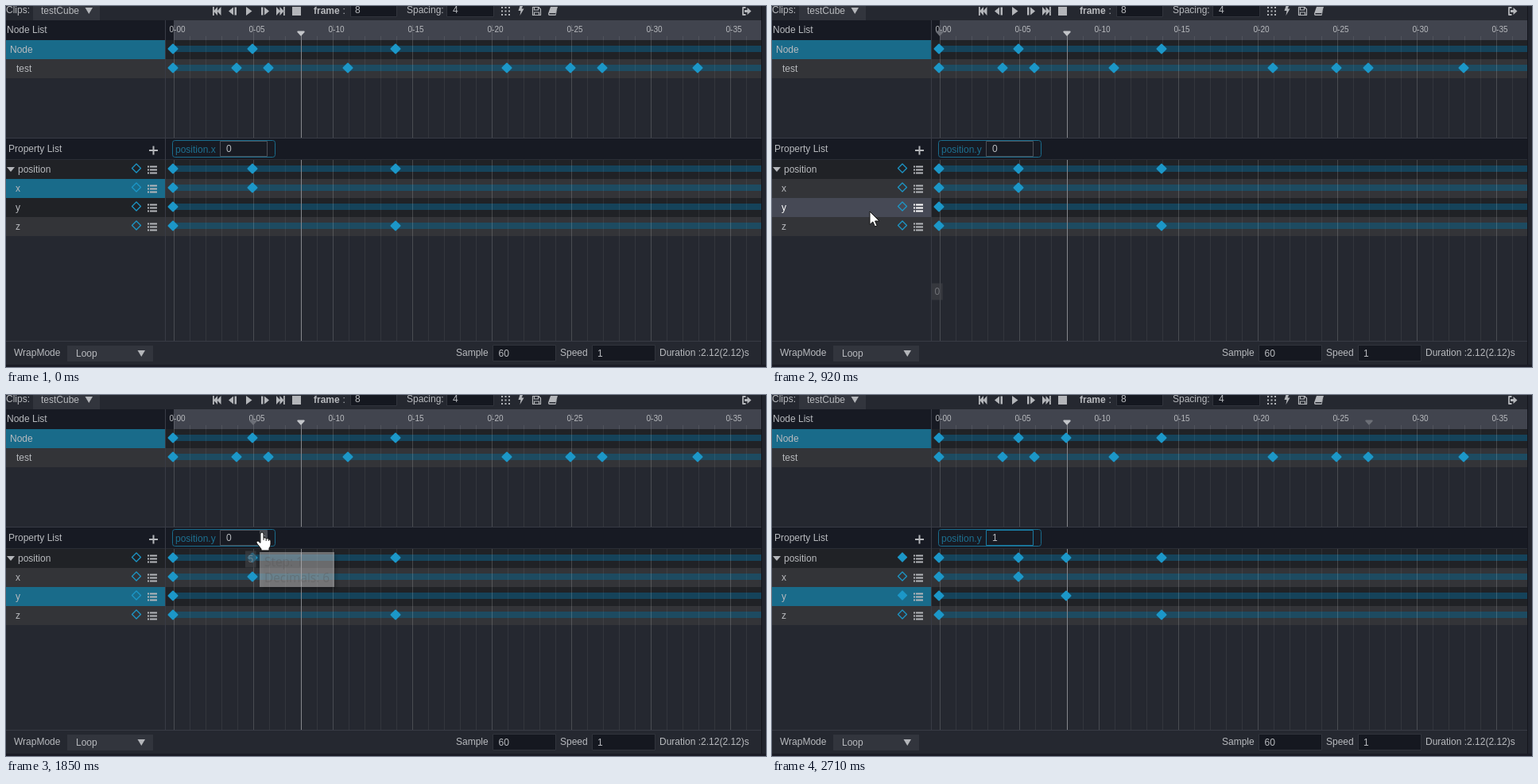
An HTML page with a canvas that plays this animation: 956 px wide and 455 px high, repeating every 2.78 s.

```html
<!DOCTYPE html>
<html lang="en">
<head>
<meta charset="utf-8">
<title>Animation timeline editor</title>
<style>
html, body { margin: 0; width: 100%; height: 100%; overflow: hidden; background: #252830; }
canvas { display: block; width: 956px; height: 455px; }
</style>
</head>
<body>
<canvas id="stage" width="956" height="455"></canvas>
<script>
const ctx = document.getElementById('stage').getContext('2d');
const LOOP = 2780;
const SANS = '"Liberation Sans", Arial, sans-serif';
const C = {
  panel: '#252830', head: '#171a23', ruler: '#41444e', line: '#383b45', input: '#151820',
  select: '#32353d', text: '#b8babe', icon: '#b4b6ba', dark: '#202226', alt: '#333438',
  hover: '#464955', active: '#196b8a', key: '#1c97c8', white: '#ffffff'
};
const frameX = n => 211 + 20 * n;

// Bursts of picture changes: start, end, number of steps.
const bursts = [[150, 610, 7], [760, 1240, 7], [1320, 1540, 4], [1850, 2310, 7], [2480, 2710, 4]];

// Pointer stops: time, x, y.
const path = [
  [150, 522, 436], [303, 360, 408], [457, 211, 360], [533, 109, 267], [610, 123, 259],
  [920, 123, 259], [1000, 134, 256], [1240, 296, 238], [1467, 312, 207], [1540, 322, 174],
  [2310, 322, 174], [2480, 420, 250], [2633, 758, 421]
];

function snap(t) {
  let last = 0;
  for (const [from, to, n] of bursts) {
    const gap = (to - from) / (n - 1);
    for (let i = 0; i < n; i++) if (from + i * gap <= t + 4) last = from + i * gap;
  }
  return last;
}

function pointerAt(t) {
  if (t < 149 || t > 2650) return null;
  let i = 0;
  while (i < path.length - 2 && path[i + 1][0] <= t) i++;
  const [t0, x0, y0] = path[i], [t1, x1, y1] = path[i + 1];
  const k = Math.min(1, Math.max(0, (t - t0) / (t1 - t0)));
  return { x: x0 + (x1 - x0) * k, y: y0 + (y1 - y0) * k };
}

// Drawing helpers
function rect(x, y, w, h, fill) {
  ctx.fillStyle = fill;
  ctx.fillRect(x, y, w, h);
}
function frame(x, y, w, h, stroke, r = 0) {
  ctx.beginPath();
  ctx.roundRect(x + .5, y + .5, w - 1, h - 1, r);
  ctx.lineWidth = 1;
  ctx.strokeStyle = stroke;
  ctx.stroke();
}
function text(str, x, y, fill = C.text, font = '12px ' + SANS) {
  ctx.font = font;
  ctx.fillStyle = fill;
  ctx.fillText(str, x, y);
}
function shape(d, x, y, fill, stroke, width = 1) {
  const p = new Path2D(d);
  ctx.save();
  ctx.translate(x, y);
  if (fill) { ctx.fillStyle = fill; ctx.fill(p); }
  if (stroke) { ctx.strokeStyle = stroke; ctx.lineWidth = width; ctx.lineJoin = 'round'; ctx.stroke(p); }
  ctx.restore();
}
function field(x, y, w, h, value, tx, ty) {
  rect(x, y, w, h, C.input);
  frame(x, y, w, h, '#31343c');
  text(value, tx, ty);
}
const caret = (x, y) => shape('M0 0H9.5L4.75 8Z', x, y, C.icon);
const key = (x, y) => shape('M0-5.6L5.6 0L0 5.6L-5.6 0Z', x, y, C.key, C.key, 1.8);
const tip = (x, fill) => shape('M-4-2.5H4Q5-2.5 4.6-1L0 4L-4.6-1Q-5-2.5-4-2.5Z', x, 34, fill);

function listIcon(y, fill) {
  for (const dy of [-4, 0, 4]) {
    rect(178, y + dy - 1, 2, 2, fill);
    rect(181, y + dy - 1, 9, 2, fill);
  }
}

function topBar() {
  text('Clips:', 0, 9);
  rect(34, 0, 84, 18, C.select);
  text('testCube', 44, 10);
  caret(99.5, 2);
  const back = 'M10.5 0V11L5.5 5.5Z M6 0V11L1 5.5Z M0 0H1.8V11H0Z';
  const step = 'M0 5.5L6 .5V10.5Z M7.5 .5H10V10.5H7.5Z';
  shape(back, 260, 1, C.icon);
  shape(step, 280, 1, C.icon);
  shape('M0 0L7.5 5.5L0 11Z', 302, 1, C.icon);
  shape('M0 .5H2.5V10.5H0Z M4 .5L10 5.5L4 10.5Z', 321, 1, C.icon);
  shape('M0 0V11L5 5.5Z M4.5 0V11L9.5 5.5Z M9 0H10.8V11H9Z', 340, 1, C.icon);
  rect(360, 1, 11, 11, C.icon);
  text('frame', 387, 10, C.text, 'bold 12px ' + SANS);
  text(':', 423.5, 10);
  field(433, -8, 59, 22, '8', 439, 9);
  text('Spacing:', 504, 9);
  field(554, -8, 60, 22, '4', 562, 9);
  for (let i = 0; i < 9; i++) rect(623 + i % 3 * 4.5, 1 + Math.floor(i / 3) * 4.5, 2, 2, C.icon);
  shape('M2 0H5.5L4.2 3.5H7L2 12L3 6H0Z', 644.5, 0, C.icon);
  shape('M.5 .5H8L10.5 3V10.5H.5Z M2.5 .5V4H7.5V.5 M2.5 10.5V7H8.5V10.5', 662, 1, null, C.icon, 1.2);
  shape('M3 0H12L9.5 8H1.5Q.8 9.6 2 9.6H9L11.5 3L9.5 11H1.5Q-.5 10.5 0 8.5Z', 682, 1, C.icon);
  shape('M4.5 1H1V10H4.5', 926, 1, null, C.icon, 1.8);
  shape('M3 4H6.5V1L11.5 5.5L6.5 10V7H3Z', 926, 1, C.icon);
}

function footer() {
  rect(0, 422, 950, 1, C.line);
  text('WrapMode', 10, 441);
  rect(77, 428, 108, 20, C.select);
  text('Loop', 88, 442);
  caret(165.5, 434);
  text('Sample', 566, 441);
  field(612, 427, 80, 21, '60', 619.5, 442);
  text('Speed', 697, 441);
  field(737, 427, 80, 21, '1', 744, 442);
  text('Duration :2.12(2.12)s', 822, 441);
  rect(0, 452, 956, 3, '#1b1c26');
}

function ruler() {
  rect(201, 18, 749, 25, C.head);
  rect(211, 18, 739, 25, C.ruler);
  for (let n = 0; n < 37; n++) {
    const major = n % 5 === 0;
    rect(frameX(n), major ? 24 : 38, 1, major ? 19 : 5, major ? '#5a5d66' : '#50535c');
    if (major) text('0-' + String(n).padStart(2, '0'), frameX(n) - 5.5, 33, C.text, '10px ' + SANS);
  }
}

function rowBand(y, alt) {
  rect(0, y, 950, 24, alt ? C.alt : C.dark);
}
function gridLines() {
  for (let n = 0; n < 37; n++) {
    const tone = n % 5 ? 'rgba(255,255,255,.065)' : 'rgba(255,255,255,.17)';
    rect(frameX(n), 43, 1, 123, tone);
    rect(frameX(n), 194, 1, 228, tone);
  }
}
function track(y, alt, keys) {
  rect(210, y - 4, 740, 8, alt ? '#1d4b61' : '#15435a');
  return () => keys.forEach(n => key(210 + 20 * n, y));
}

function leftCell(y, state) {
  if (state === 'active') rect(0, y, 200, 24, C.active);
  if (state === 'hover') rect(0, y, 200, 24, C.hover);
}

function valueBox(s) {
  frame(209, 169, 130, 22, '#1a6c8c', 3);
  text('position.' + s.axis, 213, 185, '#1d6f8f');
  rect(269, 170, 60, 20, '#181b23');
  frame(269, 170, 60, 20, s.focus ? '#1a7ba3' : '#4c4f57');
  text(s.value, 277, 184);
  if (s.spinner) {
    rect(319, 171, 9, 18, '#4a4c52');
    shape('M1.5 7L4.5 4L7.5 7Z M1.5 11L4.5 14L7.5 11Z', 319, 171, '#8c8e93');
  }
}

function tooltip(alpha) {
  if (!alpha) return;
  ctx.save();
  ctx.globalAlpha = alpha;
  ctx.shadowColor = 'rgba(0,0,0,.55)';
  ctx.shadowBlur = 4;
  ctx.shadowOffsetX = ctx.shadowOffsetY = 3;
  rect(319, 198, 94, 44, C.white);
  ctx.shadowColor = 'transparent';
  frame(319, 198, 94, 44, '#767676');
  const font = '15.4px "Open Sans", "Noto Sans", sans-serif';
  text('Step: 1', 325, 216, '#575757', font);
  text('Decimals: 6', 325, 236, '#575757', font);
  ctx.restore();
}

function hoverLabel(label) {
  ctx.font = '12px ' + SANS;
  const x = frameX(label.n) - 10;
  rect(x, label.y - 10.5, ctx.measureText(label.n).width + 7, 21, 'rgba(66,68,73,.6)');
  text(label.n, x + 3.5, label.y + 4, 'rgba(150,152,156,.6)');
}

function arrow(x, y) {
  shape('M0 0V16.5L3.8 13L6.5 19L9.2 17.8L6.6 12H12Z', x, y, C.white, '#101010', 1);
}
function hand(x, y) {
  shape('M-2 1Q-2-1 0-1Q2-1 2 1V6Q5 5 5.2 7Q8 6 8.4 8Q11 7.4 11 10V14Q11 17 9 19V22H-1V20L-6.5 13' +
    'Q-8 10.5-6 10Q-4.6 9.6-2 12.4Z', x, y, C.white, '#101010', 1);
  shape('M2 6V9 M5.2 7V10 M8.4 8V10', x, y, null, '#101010', .9);
}

// Everything that depends on the time.
function stateAt(t) {
  const pointer = pointerAt(t);
  const overTime = p => p && p.x >= 201 && p.y >= 194 && p.y <= 422;
  let label = null;
  const passes = [[150, 457], [1160, 1467], [2480, 2633]];
  for (const [from, to] of passes) {
    if (t < from - 1) continue;
    const p = pointerAt(Math.min(t, to));
    if (p && p.x >= 201) label = { n: Math.round((p.x - 211) / 20), y: Math.min(p.y, 411), on: overTime(p) };
  }
  const inList = pointer && pointer.x < 200 ? Math.floor((pointer.y - 194) / 24) : -1;
  const done = t >= 2232;
  return {
    pointer, label,
    hover: inList,
    active: t < 759 ? 1 : 2,
    axis: t < 759 ? 'x' : 'y',
    value: done ? '1' : '0',
    focus: t >= 2079,
    spinner: t >= 1539 && t < 2479,
    hand: t >= 1539 && t < 2479,
    done,
    ghost: t < 2700,
    tip: t < 1849 || done ? 0 : Math.min(1, (t - 1770) / 230, (2235 - t) / 210)
  };
}

function draw(t) {
  const s = stateAt(t);
  const added = s.done ? [8] : [];
  rect(0, 0, 956, 455, C.panel);
  topBar();
  ruler();
  rect(0, 18, 200, 25, C.head);
  text('Node List', 1, 34);
  rowBand(43, false);
  rowBand(67, true);
  leftCell(43, 'active');
  text('Node', 5, 59);
  text('test', 13, 83);

  rect(0, 166, 950, 28, C.head);
  rect(0, 166, 950, 1, C.line);
  rect(0, 193, 950, 1, '#2a2d36');
  text('Property List', 3, 184);
  rect(180, 181, 11, 2, C.icon);
  rect(184.5, 176.5, 2, 11, C.icon);
  valueBox(s);

  const names = ['position', 'x', 'y', 'z'];
  names.forEach((name, i) => {
    const y = 194 + 24 * i;
    const hot = s.hover === i;
    rowBand(y, i % 2 === 1);
    leftCell(y, hot ? 'hover' : s.active === i ? 'active' : '');
    text(name, i ? 12 : 15, y + 16, hot ? C.white : C.text);
    const filled = s.done && i % 2 === 0;
    shape('M0-5.5L5.5 0L0 5.5L-5.5 0Z', 164, y + 10.5, filled ? C.key : null, C.key, 1.3);
    listIcon(y + 12.5, hot ? C.white : C.icon);
  });
  shape('M0 0H10L5 6Z', 1, 203, C.icon);

  const keys = [
    track(54, false, [0, 5, 14, ...added]),
    track(78, true, [0, 4, 6, 11, 21, 25, 27, 33]),
    track(205, false, [0, 5, 14, ...added]),
    track(229, true, [0, 5]),
    track(253, false, [0, ...added]),
    track(277, true, [0, 14])
  ];
  gridLines();
  rect(200, 18, 1, 404, C.line);
  rect(371, 37, 1, 129, '#85878c');
  rect(371, 194, 1, 228, '#85878c');
  keys.forEach(drawKeys => drawKeys());
  if (s.label) {
    tip(frameX(s.label.n), '#6c6f77');
    if (s.ghost) hoverLabel(s.label);
  }
  tip(371, '#c3c5c9');
  rect(950, 0, 1, 452, '#14161d');
  rect(951, 0, 5, 452, '#22252e');
  footer();
  tooltip(s.tip);
  if (s.pointer) (s.hand ? hand : arrow)(s.pointer.x, s.pointer.y);
}

let shown = -1;
function tick() {
  const t = snap(performance.now() % LOOP);
  if (t !== shown) draw(shown = t);
  requestAnimationFrame(tick);
}
tick();
</script>
</body>
</html>
```
